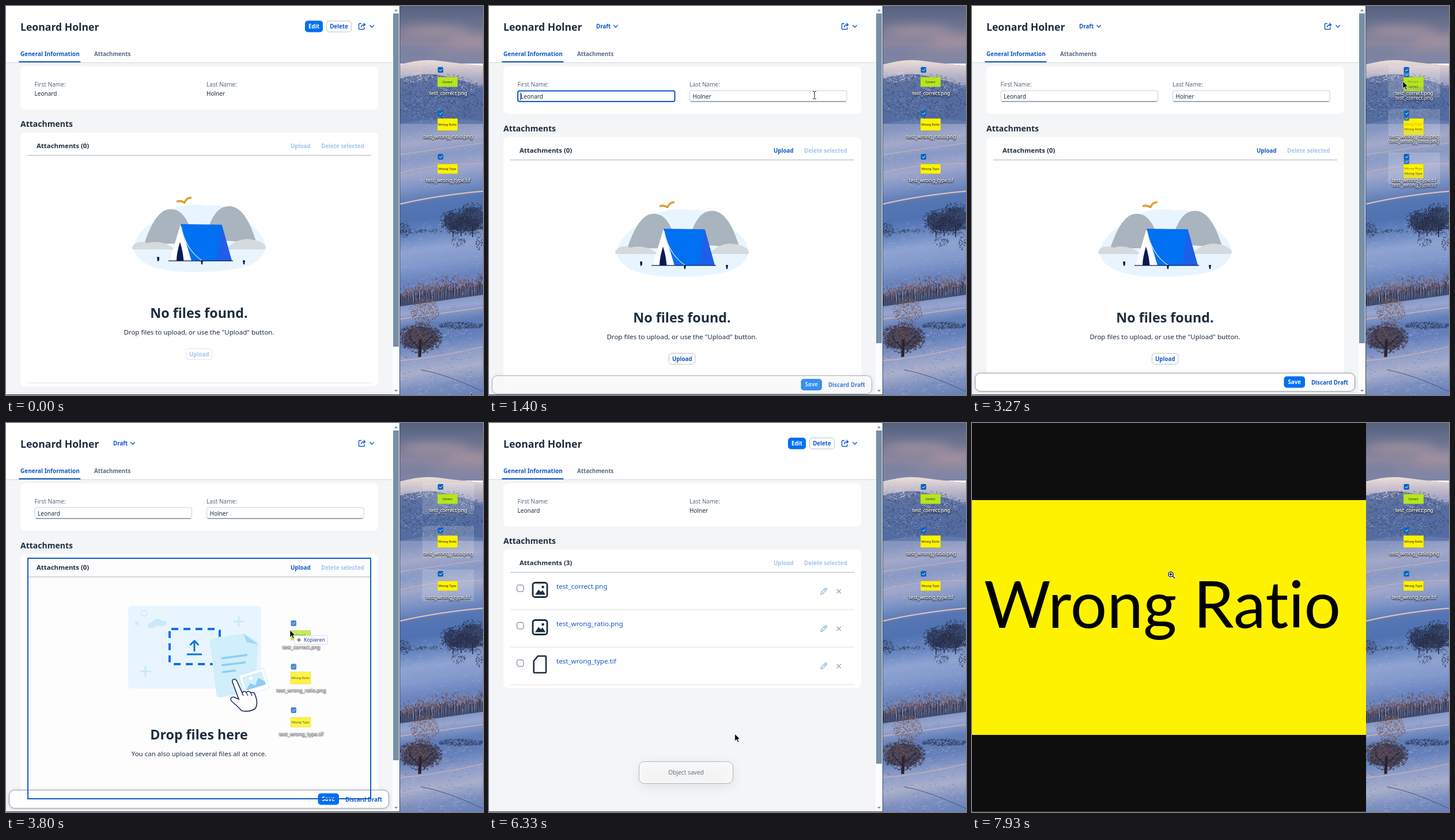
These frames come from a looping animation (828 by 676 pixels, 8 s). An HTML page with a canvas:

```html
<!DOCTYPE html>
<html lang="en">
<head>
<meta charset="utf-8">
<title>Attachments upload</title>
<style>
html, body { margin: 0; width: 100%; height: 100%; overflow: hidden; }
canvas { display: block; }
</style>
</head>
<body>
<canvas id="stage" width="828" height="676"></canvas>
<script>
const LOOP = 8000;
const EDIT = 1200, BLUR = 2200, SELECT = 2730, DRAG = 3265, DROP = 4130, LISTED = 4270,
      SAVED = 6200, HOVER = 6900, STATUS = 7130, PRESS = 7530, IMAGE = 7730;
const FIRST = 'Leonard', LAST = 'Holner';
const BLUE = '#0070f2', LINK = '#0d57c8', INK = '#1d2d3e', GREY = '#556b82', FADED = '#a2c6ee', NAVY = '#0b1a54';
const FILES = ['test_correct.png', 'test_wrong_ratio.png', 'test_wrong_type.tif'];
const SANS = '"Noto Sans", "Open Sans", sans-serif';

const screen = document.getElementById('stage').getContext('2d');
let g = screen;

// ---- helpers ----
function text(s, x, y, size, color, { weight = 400, align = 'left', font = SANS } = {}) {
  g.font = `${weight} ${size}px ${font}`;
  g.textAlign = align;
  g.fillStyle = color;
  g.fillText(s, x, y);
}
function shape(d, fill, stroke, width = 1) {
  const path = typeof d === 'string' ? new Path2D(d) : d;
  if (fill) { g.fillStyle = fill; g.fill(path); }
  if (stroke) { g.strokeStyle = stroke; g.lineWidth = width; g.stroke(path); }
}
function box(x, y, w, h, r, fill, stroke, width) {
  const path = new Path2D();
  path.roundRect(x, y, w, h, r);
  shape(path, fill, stroke, width);
}
function oval(x, y, rx, ry, fill, stroke, width) {
  const path = new Path2D();
  path.ellipse(x, y, rx, ry, 0, 0, 7);
  shape(path, fill, stroke, width);
}
function at(x, y, draw, alpha = 1) {
  g.save();
  g.translate(x, y);
  g.globalAlpha *= alpha;
  draw();
  g.restore();
}
function shadowed(color, blur, dy, draw) {
  g.save();
  g.shadowColor = color; g.shadowBlur = blur; g.shadowOffsetY = dy;
  draw();
  g.restore();
}
// White raised panel; the outline itself casts no shadow
function panel(x, y, w, h, color, blur, dy) {
  shadowed(color, blur, dy, () => box(x, y, w, h, 9, '#fff'));
  box(x, y, w, h, 9, null, '#8796a5');
}
const inside = (p, x, y, w, h) => p.x >= x && p.x <= x + w && p.y >= y && p.y <= y + h;

// ---- desktop ----
const wallpaper = paintWallpaper();

function paintWallpaper() {
  const canvas = document.createElement('canvas');
  canvas.width = 828; canvas.height = 676;
  g = canvas.getContext('2d');
  let seed = 7;
  const rnd = () => (seed = seed * 16807 % 2147483647) / 2147483647;
  const fade = (y0, y1, ...colors) => {
    const f = g.createLinearGradient(0, y0, 0, y1);
    colors.forEach((c, i) => f.addColorStop(i / (colors.length - 1), c));
    return f;
  };
  // Short random strokes filling an ellipse
  const scrub = (cx, cy, rx, ry, n, color, len = 4, tilt = 1) => {
    g.strokeStyle = color; g.lineWidth = 0.9;
    g.beginPath();
    for (let i = 0; i < n; i++) {
      const a = rnd() * 6.283, r = Math.sqrt(rnd());
      const x = cx + Math.cos(a) * r * rx, y = cy + Math.sin(a) * r * ry;
      g.moveTo(x, y);
      g.lineTo(x + (rnd() - 0.5) * len, y + (rnd() - 0.5) * len * tilt);
    }
    g.stroke();
  };

  g.fillStyle = fade(0, 100, '#56617f', '#6c7391', '#8f889f', '#7d85a5');
  g.fillRect(684, 0, 144, 100);
  g.filter = 'blur(9px)';
  oval(745, 44, 60, 9, '#a191a1'); oval(805, 60, 40, 8, '#a8949f'); oval(705, 80, 40, 7, '#747da0');
  g.filter = 'none';

  // Snowy ridge above a rocky, shaded slope
  shape('M684 102Q720 91 750 95T828 104V230H684Z', fade(95, 225, '#ecdcd6', '#a9a9c3', '#667cab', '#5b74a8', '#7287b6'));
  shape('M684 126Q730 112 770 124L828 140V200Q750 190 684 205Z', '#526a9ecc');
  scrub(756, 160, 85, 42, 700, '#35456f', 6, 0.6);
  scrub(710, 118, 35, 14, 120, '#dfcfd2', 8, 0.5);
  scrub(790, 130, 45, 22, 200, '#bcb7c9', 6, 0.6);
  scrub(735, 175, 50, 28, 150, '#8599c5', 8, 0.5);

  // Fields climbing to the right
  g.save();
  g.beginPath();
  g.rect(684, 205, 144, 471);
  g.clip();
  g.transform(1, -0.14, 0, 1, 0, 0.14 * 756);
  g.fillStyle = fade(205, 685, '#8495c0', '#a3a8c9', '#8799c5', '#a0a7cb', '#7b92c4', '#5676b3', '#4f72b1', '#6785c0',
    '#8ea3d1', '#8299cc', '#6984bd', '#7089c0', '#98a6cf', '#5f7db8', '#6480ba', '#8c9cc8', '#a9aecb', '#7d90c0', '#6580b9');
  g.fillRect(684, 190, 144, 510);
  scrub(756, 260, 85, 55, 220, '#bdb7cb88', 14, 0.15);
  scrub(756, 430, 85, 60, 160, '#a9b8dc77', 14, 0.15);
  scrub(756, 620, 85, 60, 260, '#c3bdcd77', 14, 0.25);
  scrub(756, 600, 85, 80, 160, '#4a649c77', 10, 0.25);
  shape('M684 248H828M684 280Q750 272 828 284', null, '#c5b0b6', 1.3);
  shape('M684 334Q750 328 828 332', null, '#dfbfb5', 2.2);
  shape('M684 534H828M684 606Q750 610 828 602', null, '#c9b0b2', 1.6);
  g.restore();
  scrub(720, 391, 42, 4, 110, '#323c5c', 5, 0.6);
  scrub(795, 396, 38, 3, 70, '#414d73', 5, 0.6);
  shape('M720 632Q765 640 828 670', null, '#4c5273', 1);

  // Trees
  for (const [x, y, rx, ry] of [[778, 374, 24, 21], [810, 367, 26, 25], [796, 382, 34, 14]]) {
    oval(x, y, rx * 0.75, ry * 0.7, '#2f3957bb');
    scrub(x, y, rx, ry, 300, '#232a42', 6);
  }
  shape('M776 392V402M790 392V400M810 385V402', null, '#242a40', 1.5);
  scrub(692, 388, 10, 14, 120, '#2a314b');
  scrub(785, 410, 12, 10, 80, '#353d5b');
  scrub(822, 412, 7, 12, 70, '#353d5b');
  for (let x = 684; x < 830; x += 1.5) {
    const base = 522 - (x - 684) * 0.14, h = 24 + rnd() * 18;
    shape(`M${x} ${base}l${rnd() * 4 - 2} ${-h * 0.6}`, null, '#2c3049', 1.1);
    scrub(x, base - h * 0.7, 4, h * 0.35, 9, rnd() < 0.5 ? '#8a584f' : '#5a4653', 4, 2);
  }
  scrub(726, 530, 25, 25, 260, '#705455', 6);
  scrub(730, 520, 18, 14, 70, '#a4735f', 5);
  scrub(790, 555, 40, 6, 330, '#29314c', 4);
  scrub(715, 562, 34, 4, 90, '#39415f', 5, 0.6);
  oval(720, 577, 30, 20, '#3f3745aa');
  scrub(720, 577, 37, 26, 750, '#382c36', 7);
  scrub(712, 568, 30, 16, 130, '#80594c', 6);
  shape('M716 609L718 580H721L720 609ZM718 595L700 577M720 592L742 572', '#2b2430', '#2b2430', 1.5);
  g = screen;
  return canvas;
}

function desktopIcons() {
  FILES.forEach((name, i) => {
    const y = 111 + i * 75.5;
    const h = i === 1 ? 21 : 17, mid = y + (i === 1 ? 19.5 : 21);
    box(749, mid - h / 2, 35, h, 0, i ? '#fff200' : '#b5e61d', '#8888', 0.5);
    text(['Correct', 'Wrong Ratio', 'Wrong Type'][i], 766, mid + 1.5, i ? 5.8 : 5.2, '#222', { align: 'center', font: 'Lato, sans-serif' });
    box(749.5, y - 5, 9.5, 10, 2, '#0b63bd');
    shape(`M752 ${y}l2 2 3.5-3.8`, null, '#fff', 1);
    shadowed('#000', 2, 1, () => {
      for (let k = 0; k < 2; k++) text(name, 767.5, y + 43.5, 8.65, '#fff', { align: 'center' });
    });
  });
}

function desktop(t) {
  g.drawImage(wallpaper, 0, 0);
  if (t >= SELECT && t < DROP)
    for (let i = 0; i < 3; i++) box(723, 104 + i * 75.5, 89, 54, 1, '#ffffff2a', '#ffffff18');
  desktopIcons();
}

// ---- page parts ----
const chevron = (x, y) => shape(`M${x - 3.7} ${y - 1.7}l3.7 3.7 3.7-3.7`, null, LINK, 1.4);

function button(label, x, y, w, { fill, stroke, color = LINK }) {
  if (stroke) box(x + 0.5, y + 0.5, w - 1, 19, 5, fill, stroke);
  else box(x, y, w, 20, 5, fill);
  text(label, x + w / 2, y + 13.5, 9.75, color, { weight: 600, align: 'center' });
}

function header(editing, p) {
  box(0, 0, 671, 98, 0, '#fff');
  box(0, 98, 671, 1, 0, '#d3d7db');
  text(`${FIRST} ${LAST}`, 25, 43, 17.6, INK, { weight: 900 });
  if (editing) {
    text('Draft', 186, 39, 9.75, LINK, { weight: 600 });
    chevron(220, 35);
  } else {
    button('Edit', 519, 25.5, 31, { fill: inside(p, 519, 26, 31, 19) ? '#0064d9' : BLUE, color: '#fff' });
    button('Delete', 556, 25.5, 44, { fill: '#fff', stroke: '#b7c0c9' });
  }
  shape('M617 30.5H613.5Q612.5 30.5 612.5 31.5V39.5Q612.5 40.5 613.5 40.5H621Q622 40.5 622 39.5V37M616.5 37Q616.5 32.5 623 32.5M620.5 29.5L623.5 32.5 620.5 35.5', null, LINK, 1.4);
  chevron(635, 35);
  text('General Information', 25, 86.5, 10, LINK, { weight: 700 });
  text('Attachments', 153, 86.5, 9.75, GREY, { weight: 700 });
  box(22, 96, 107.5, 2, 1, LINK);
}

function field(label, value, x, editing, focused, caret) {
  text(label, x, 140, 10.05, GREY);
  if (!editing) return text(value, x, 156, 10.05, INK);
  if (focused) {
    box(x + 0.5, 147.5, 272.5, 18.5, 3, '#fff', LINK, 2);
    if (caret) box(x + 5, 150.5, 1, 13, 0, '#000');
  } else {
    box(x + 0.5, 147, 272.5, 19, 3, '#fff', '#c9d0d6');
    box(x + 2, 165.6, 269.5, 1, 0, GREY);
  }
  text(value, x + 5.5, 160.5, 10.05, INK);
}

function campsite() {
  shape('M222 420C224 398 244 380 262 372C290 345 325 342 352 347C385 342 415 366 430 385C442 395 451 408 450 421C447 440 424 455 392 458C350 464 300 464 274 458C240 452 222 436 222 420Z', '#e8f5ff');
  shape('M240 413C254 372 268 353 286 353C306 353 318 372 328 413ZM346 405C354 370 366 348 387 348C410 348 424 376 435 412Z', '#a9b4be');
  shape('M219 420C222 410 234 408 246 412C262 407 282 412 292 423H220ZM380 423C394 412 406 402 428 406C442 408 452 414 451 421L449 423Z', '#d5dade');
  shape('M303 379L284 443H332Z', '#fff');
  shape('M303 379L374.5 380 392 443H338Q308 418 303 379Z', BLUE);
  shape('M374.5 380L392 443H365Z', '#1f5fe8');
  shape('M303 379L322 443H340Q312 416 303 379Z', BLUE);
  shape('M304 383Q312 424 341 443', null, '#fff', 1.1);
  shape('M302 410Q296 430 296 443H308.5Q307 425 302 410ZM262 436h4v6l-3 2zM338 442h4l-1 7h-2zM411 442h4l-1 7h-2z', NAVY);
  shape('M282 442.8H394', null, NAVY, 1.2);
  shape('M296 340Q302 336 310 341.5Q313 332 322 333', null, '#e7a024', 2.8);
  shape('M297 341Q303 339 310 342.5Q314 336 321 334', null, '#ab6a0c', 0.7);
}

function emptyState(editing) {
  campsite();
  text('No files found.', 335, 542, 23.3, INK, { weight: 700, align: 'center' });
  text('Drop files to upload, or use the "Upload" button.', 335, 571, 11.5, INK, { align: 'center' });
  button('Upload', 312, 595, 46.5, editing ? { fill: '#fff', stroke: '#b7c0c9' } : { stroke: '#dfe4e9', color: FADED });
}

function dropState() {
  box(212, 318, 231, 143.5, 6, '#e8f5fe');
  shape('M404 336V354M395 345H413M242 422V441M232.5 431.5H251.5', null, '#cbe8fa', 3);
  oval(240, 330.5, 5, 5, null, '#cbe8fa', 1.3);
  oval(227, 348, 3, 3, '#cbe8fa');
  shape('M247 355Q244 347 254 346Q262 336 270 343Q280 342 278 349Q274 355 262 352Q256 358 247 355Z', '#cbe8fa');
  g.setLineDash([12, 9]);
  box(284, 358, 87, 61, 3, null, '#0a70e6', 4);
  g.setLineDash([]);
  shape('M327 397V379M319.5 386L327 378.5 334.5 386M314 402H340', null, '#0a70e6', 3);
  shape('M354 380Q354 375 359 374L412 366 435 378 438 384 432 460Q431 466 425 467L371 477Q366 477 365 471Z', '#d1eefb');
  shape('M412 366L438 385 418 381Z', '#9fd8f4');
  shape('M374 409L419 403M374 421L416 416M375 433L399 430', null, '#8ad0f2', 3.5);
  at(431, 450, () => {
    g.rotate(-0.3);
    box(-22, -18, 44, 36, 1, '#fff', '#d5ecf8');
    box(-18, -14, 36, 24, 0, '#d6effb');
    shape('M-18 10L-8 0 0 6 9-5 18 5V10Z', '#8ad0f2');
    oval(-4, -8, 3, 3, '#fff');
  });
  shape('M393 450Q392 445 397 445Q400 446 402 451L410 469Q413 464 417 468Q422 464 425 469Q431 466 433 474Q438 487 433 496Q424 503 409 500Q402 492 391 483Q388 477 395 476L404 480Z', '#fff', '#1a2b58', 1.6);
  shape('M410 469L412 474M417 468L420 474M425 469L427 474', null, '#1a2b58', 1.3);
  text('Drop files here', 335, 549.5, 23.2, INK, { weight: 700, align: 'center' });
  text('You can also upload several files all at once.', 335, 579, 11.5, INK, { align: 'center' });
}

function fileRow(name, top, editing, hovered, pressed) {
  box(48.5, top + 22, 11.5, 11.5, 3, '#fff', '#5f7388');
  if (name.endsWith('png')) {
    box(76, top + 18, 25, 25, 4, null, INK, 2.8);
    shape(`M80 ${top + 39}l6-9 4 4 3-3 5 8z`, INK);
    oval(93.5, top + 25.5, 2.3, 2.3, INK);
  } else {
    shape(`M85 ${top + 15.5}H97.5Q99 ${top + 15.5} 99 ${top + 17}V${top + 43}Q99 ${top + 44.5} 97.5 ${top + 44.5}H79Q77.7 ${top + 44.5} 77.7 ${top + 43}V${top + 24}Z`, null, INK, 2.6);
  }
  if (pressed) box(117, top + 15, 115.5, 17, 0, '#0033a0');
  const color = pressed ? '#fff' : LINK;
  text(name, 117, top + 28.5, 11.6, color);
  if (hovered) box(117, top + 30, g.measureText(name).width, 1, 0, color);
  at(581, top + 33, () => {
    shape('M-5 5L-4.2 1.5 3-5.2Q4-6 5-5T5.2-3L-1.8 4.2ZM1.4-3.8L3.8-1.4', null, editing ? LINK : '#85afe6', 1.2);
    shape('M22.5-3.7l7.4 7.4m0-7.4l-7.4 7.4', null, editing ? LINK : '#8d99a5', 1.2);
  });
  box(37, top + 64.5, 597, 1, 0, '#dcdfe3');
}

function attachments(t, editing, dropping) {
  const saved = t >= SAVED, listed = t >= LISTED;
  text('Attachments', 25, 209.5, 14, INK, { weight: 700 });
  box(25, 220, 621, listed ? 241 : 441, 8, '#fff');
  if (dropping) box(38, 227, 595, 418, 0, '#fdfdfe');
  text(`Attachments (${saved ? 3 : 0})`, 53, 247, 11.4, INK, { weight: 700 });
  text('Upload', 494, 246.8, 9.75, editing ? LINK : FADED, { weight: 600 });
  text('Delete selected', 547, 246.8, 9.75, FADED, { weight: 600 });
  box(37, 259, 597, 1, 0, '#a9b4be');
  if (listed) {
    const names = saved ? FILES : [...FILES].reverse();
    names.forEach((name, i) => {
      const active = saved && i === 1;
      fileRow(name, 259.5 + i * 65, editing, active && t >= HOVER, active && t >= PRESS);
    });
  } else {
    if (dropping) at(0, -8, dropState);
    else emptyState(editing);
    box(37, 654.5, 597, 1, 0, '#dcdfe3');
  }
}

function footer(t, p) {
  const k = Math.min(1, Math.max(0, (t - 1230) / 220));
  at(0, 20 * (1 - k), () => {
    panel(5.5, 638, 659, 31.5, '#0002', 8, 1);
    button('Save', 541.5, 643.5, 36.5, { fill: inside(p, 542, 644, 36, 20) ? '#0061d3' : BLUE, color: '#fff' });
    text('Discard Draft', 621, 657.5, 9.75, LINK, { weight: 600, align: 'center' });
  }, k);
}

function scrollbar(end) {
  box(671, 0, 12, 676, 0, '#fcfcfd');
  box(672, 13, 10, end - 13, 0, '#788fa6');
  shape('M674 9h6l-3-3.5zM674 667h6l-3 3.5z', '#788fa6');
  box(683, 0, 1, 676, 0, '#3a4a66');
}

function page(t, p) {
  const editing = t >= EDIT && t < SAVED;
  const dropping = t >= DRAG && t < DROP && p.x < 684;
  const focused = t < BLUR || t >= DROP;
  const caret = Math.floor((t - 200) / 500) % 2 === 0;
  box(0, 0, 684, 676, 0, '#f4f5f7');
  header(editing, p);
  box(25, 105, 621, editing ? 82 : 75, 8, '#fff');
  field('First Name:', FIRST, 49.5, editing, focused, caret);
  field('Last Name:', LAST, 348, editing, false);
  at(0, editing ? 8 : 0, () => attachments(t, editing, dropping));
  if (editing) footer(t, p);
  if (dropping) box(38, 235, 595, 418, 0, null, '#0d5fc8', 2);
  scrollbar(editing ? 586 : 592);
  if (t >= SAVED) {
    at(0, 0, () => {
      panel(260.5, 588.5, 163, 38, '#0002', 20, 5);
      text('Object saved', 342, 611, 10.2, INK, { align: 'center' });
    }, Math.min(1, (t - SAVED) / 200));
  }
  if (t >= STATUS) {
    box(0, 659, 226, 17, [0, 3, 0, 0], '#1f1f1f');
    text('localhost:4004/upload/.../content', 4, 670.5, 8.8, '#e6e6e6');
  }
}

function imagePage() {
  box(0, 0, 684, 676, 0, '#0e0e0e');
  box(0, 134, 684, 408, 0, '#fff200');
  g.letterSpacing = '0.2px'; // keeps "ti" from joining
  text('Wrong Ratio', 330.5, 356, 112, '#000', { align: 'center', font: 'Lato, sans-serif' });
  g.letterSpacing = '0px';
}

// ---- pointer ----
const PATH = [
  [0, 807, 672], [70, 807, 672], [870, 530, 34], [1070, 530, 34], [1400, 565, 155], [1870, 812, 200],
  [1930, 812, 200], [2730, 815, 310], [2800, 815, 310], [3070, 748, 123], [3260, 748, 123], [3270, 748, 131],
  [3800, 493, 360], [4930, 493, 360], [5400, 567, 646], [6000, 567, 646], [6800, 190, 362], [6870, 190, 362],
  [6930, 178, 354], [7600, 178, 354], [7930, 346, 264], [LOOP, 346, 264]
];
function pointer(t) {
  const i = PATH.findIndex(k => k[0] > t);
  const [t0, x0, y0] = PATH[i - 1], [t1, x1, y1] = PATH[i];
  const u = (t - t0) / (t1 - t0), e = u * u * (3 - 2 * u);
  return { x: x0 + (x1 - x0) * e, y: y0 + (y1 - y0) * e };
}

const CURSORS = {
  arrow() { g.scale(0.85, 0.85); shape('M0 0V14.5L3.4 11.3 5.8 17 8.2 16 5.8 10.5H10.4Z', '#000', '#fff', 0.8); },
  hand() { shape('M-1.5.8Q0-.8 1.5.8V6L7 7.3Q9 8 9 10L8 16.5H0L-4.5 10.5Q-5 8-2.8 8.8L-1.5 10ZM4 7V9.5M6.5 7.5V10', '#fff', '#000', 1); },
  beam() { shape('M-3-6.5H-1L0-5.5 1-6.5H3M0-5.5V5.5M-3 6.5H-1L0 5.5 1 6.5H3', null, '#111', 1); },
  zoom() {
    shape('M2 2L6 6', null, '#fff', 4);
    oval(-1, -1, 4.3, 4.3, '#fff', '#fff', 3);
    oval(-1, -1, 4.3, 4.3, '#fff', '#000', 1.3);
    shape('M-3.5-1H1.5M-1-3.5V1.5M2 2L6 6', null, '#000', 1.5);
  }
};
function cursorKind(t, p) {
  if (t >= IMAGE) return 'zoom';
  if (t >= DRAG && t < DROP) return 'arrow';
  const editing = t >= EDIT && t < SAVED;
  if (editing && (inside(p, 50, 147, 273, 20) || inside(p, 348, 147, 273, 20))) return 'beam';
  if (editing ? inside(p, 542, 644, 36, 20) : inside(p, 519, 26, 31, 19)) return 'hand';
  return t >= HOVER ? 'hand' : 'arrow';
}

function draw(t) {
  const p = pointer(t);
  desktop(t);
  if (t >= IMAGE) imagePage(); else page(t, p);
  box(0, 675, 684, 1, 0, '#3b3f4a');
  if (t >= DRAG && t < DROP) {
    at(p.x - 748, p.y - 123, desktopIcons, 0.75);
    if (p.x < 684) at(p.x, p.y, () => {
      box(7.5, 9.5, 58, 15, 2, '#fff', '#d9dde2');
      shape('M15.5 13.5V20.5M12 17H19', null, '#222', 1);
      text('Kopieren', 24, 20.3, 8.7, '#123c9c');
    });
  }
  at(p.x, p.y, CURSORS[cursorKind(t, p)]);
}

function tick() {
  draw(performance.now() % LOOP);
  requestAnimationFrame(tick);
}
tick();
</script>
</body>
</html>
```
